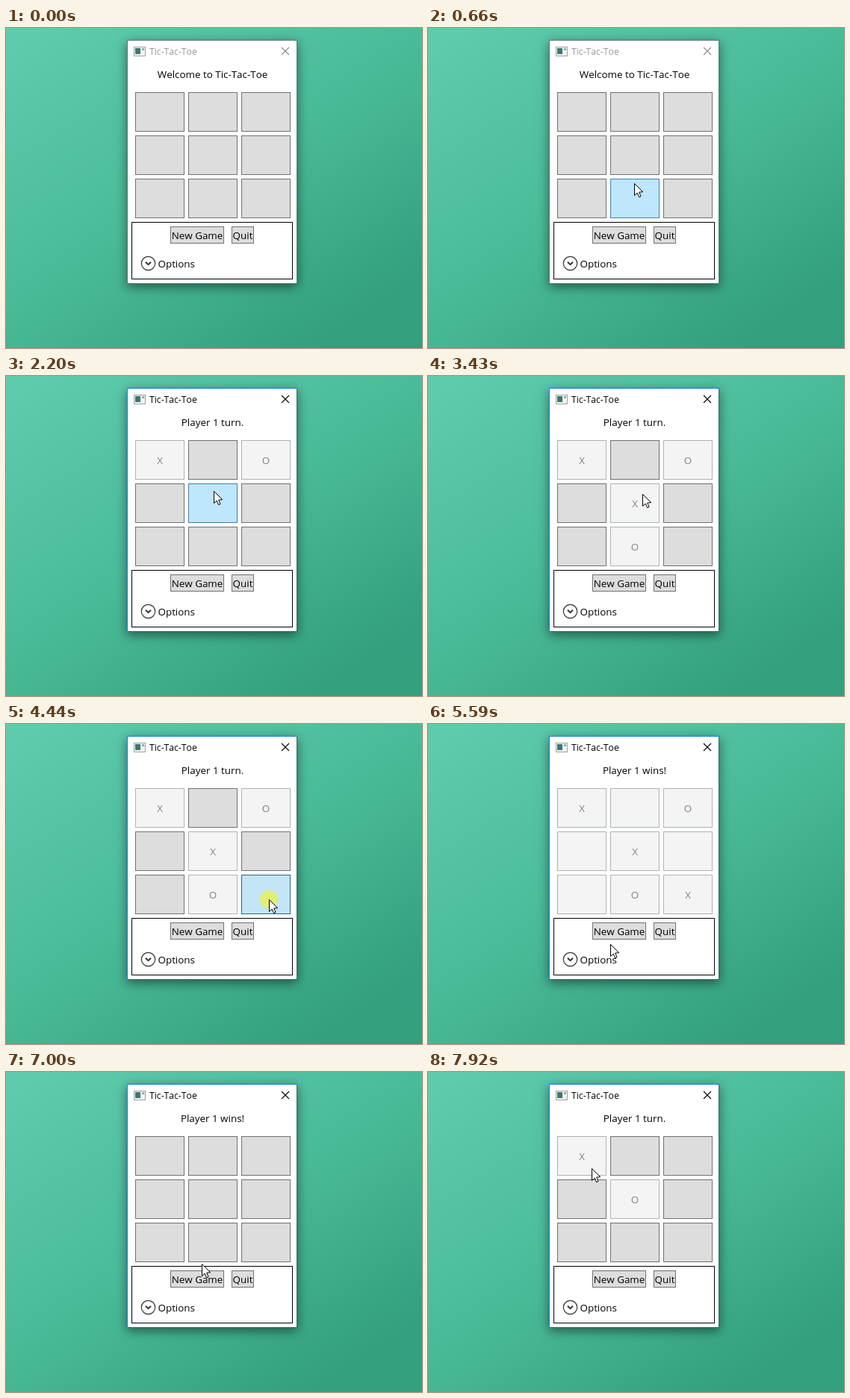
Recreate the animation shown at these times as an HTML page with a canvas. Size 557 by 429 pixels, loop 8000 ms.

```html
<!DOCTYPE html>
<html lang="en">
<head>
<meta charset="utf-8">
<title>Tic-Tac-Toe</title>
<style>
  html, body { margin: 0; width: 100%; height: 100%; overflow: hidden; }
  canvas { display: block; }
</style>
</head>
<body>
<canvas id="stage" width="557" height="429"></canvas>
<script>
const ctx = document.getElementById('stage').getContext('2d');
const LOOP = 8000, TICK = 76, CURSOR_ENTERS = 200, ACTIVATED = 1200;

// Game states: start time, message, board (row by row), finished
const STATES = [
  { at: 0,    message: 'Welcome to Tic-Tac-Toe', board: '.........' },
  { at: 1360, message: 'Player 1 turn.', board: 'X.O......' },
  { at: 2660, message: 'Player 1 turn.', board: 'X.O.X..O.' },
  { at: 4520, message: 'Player 1 wins!', board: 'X.O.X..OX', over: true },
  { at: 6600, message: 'Player 1 wins!', board: '.........' },
  { at: 7610, message: 'Player 1 turn.', board: 'X...O....' },
];

const PRESSES = [[1200, 1360], [2430, 2660], [4370, 4520], [6530, 6600], [7455, 7610]];

// Pointer moves: start time, number of ticks, end point, optional bend point
const ENTRY = [427, 401];
const MOVES = [
  { at: 200,  ticks: 11, to: [211, 125] },
  { at: 1050, ticks: 1,  to: [213, 118] },
  { at: 1970, ticks: 5,  to: [285, 158] },
  { at: 3430, ticks: 1,  to: [287, 158] },
  { at: 3660, ticks: 8,  to: [352, 235], bend: [340, 175] },
  { at: 4670, ticks: 5,  to: [382, 282] },
  { at: 5050, ticks: 2,  to: [378, 292] },
  { at: 5200, ticks: 6,  to: [244, 295], bend: [290, 319] },
  { at: 5660, ticks: 5,  to: [262, 278] },
  { at: 7000, ticks: 1,  to: [262, 257] },
  { at: 7076, ticks: 5,  to: [216, 125] },
  { at: 7920, ticks: 1,  to: [219, 129] },
];

const NORMAL = ['#dddddd', '#707070'];
const HOVER = ['#bee6fd', '#3c7fb1'];
const PRESSED = ['#c4e5f6', '#2c628b'];
const DISABLED = ['#f4f4f4', '#adb2b5'];

const smooth = p => p * p * (3 - 2 * p);

function pointerAt(t) {
  let from = ENTRY;
  for (const { at, ticks, to, bend } of MOVES) {
    if (t < at) break;
    const p = smooth(Math.min(1, (Math.floor((t - at) / TICK) + 1) / ticks));
    const start = from;
    from = to.map((end, i) => {
      const mid = bend ? bend[i] : (start[i] + end) / 2;
      return Math.round((1 - p) ** 2 * start[i] + 2 * p * (1 - p) * mid + p * p * end);
    });
  }
  return from;
}

function box(x, y, w, h, [fill, border]) {
  ctx.fillStyle = border;
  ctx.fillRect(x, y, w, h);
  ctx.fillStyle = fill;
  ctx.fillRect(x + 1, y + 1, w - 2, h - 2);
}

function text(string, x, y, { color = '#000', size = 13.4, align = 'center' } = {}) {
  ctx.font = `${size}px "Open Sans", "Noto Sans", sans-serif`;
  ctx.fontKerning = 'none';
  ctx.textAlign = align;
  ctx.fillStyle = color;
  ctx.fillText(string, x, y);
}

function polyline(points, color, width) {
  ctx.beginPath();
  points.forEach(([x, y]) => ctx.lineTo(x, y));
  ctx.strokeStyle = color;
  ctx.lineWidth = width;
  ctx.stroke();
}

function circle(x, y, r) {
  ctx.beginPath();
  ctx.arc(x, y, r, 0, 2 * Math.PI);
}

function drawDesktop() {
  const shade = ctx.createLinearGradient(90, -20, 390, 449);
  shade.addColorStop(0, '#5dcbac');
  shade.addColorStop(0.5, '#4abb98');
  shade.addColorStop(1, '#339f7c');
  ctx.fillStyle = shade;
  ctx.fillRect(0, 0, 557, 429);
}

function drawWindow(active) {
  ctx.save();
  ctx.shadowColor = 'rgba(0,0,0,.5)';
  ctx.shadowBlur = 14;
  ctx.shadowOffsetY = 4;
  ctx.fillStyle = active ? '#43636a' : '#587d74';
  ctx.fillRect(162, 16, 228, 327);
  ctx.restore();
  if (active) {
    ctx.fillStyle = '#1883d7';
    ctx.fillRect(162, 16, 228, 1);
    ctx.fillRect(162, 16, 1, 327);
  }
  ctx.fillStyle = '#fff';
  ctx.fillRect(163, 17, 226, 325);

  box(171, 25, 16, 13, ['#f4f4f4', '#a0a0a0']);
  ctx.fillStyle = '#3f7773';
  ctx.fillRect(173, 27, 7, 8);
  ctx.fillStyle = '#8ab5a5';
  ctx.fillRect(182, 27, 3, 3);

  text('Tic-Tac-Toe', 192, 36, { color: active ? '#000' : '#999', size: 12.2, align: 'left' });
  const ink = active ? '#000' : '#8a8a8a';
  polyline([[369, 26], [379, 36]], ink, 1.1);
  polyline([[379, 26], [369, 36]], ink, 1.1);
}

function drawExpander(hover) {
  circle(190.5, 315.5, 9.2);
  ctx.fillStyle = hover ? '#f3f9ff' : '#fff';
  ctx.fill();
  ctx.strokeStyle = hover ? '#5593ff' : '#333';
  ctx.lineWidth = 1.2;
  ctx.stroke();
  polyline([[187, 313.7], [190.5, 317.2], [194, 313.7]], hover ? '#000' : '#333', 2);
  text('Options', 203.5, 321, { align: 'left' });
}

function drawPointer(x, y, pressed) {
  if (pressed) {
    circle(x, y, 12);
    ctx.fillStyle = 'rgba(245,245,30,.6)';
    ctx.fill();
  }
  ctx.save();
  ctx.translate(x + 0.5, y + 0.5);
  ctx.beginPath();
  [[0, 0], [0, 16], [3.7, 12.6], [6.2, 18.2], [8.6, 17.2], [6.2, 11.6], [11.2, 11.2]]
    .forEach(([px, py]) => ctx.lineTo(px, py));
  ctx.closePath();
  ctx.fillStyle = '#fff';
  ctx.fill();
  ctx.strokeStyle = '#000';
  ctx.lineWidth = 1;
  ctx.stroke();
  ctx.restore();
}

function draw(t) {
  const state = STATES.findLast(s => t >= s.at);
  const [px, py] = pointerAt(t);
  const visible = t >= CURSOR_ENTERS;
  const pressed = PRESSES.some(([down, up]) => t >= down && t < up);
  const over = (x, y, w, h) => visible && px >= x && px < x + w && py >= y && py < y + h;
  const button = (x, y, w, h, enabled = true) =>
    box(x, y, w, h, !enabled ? DISABLED : !over(x, y, w, h) ? NORMAL : pressed ? PRESSED : HOVER);

  drawDesktop();
  drawWindow(t >= ACTIVATED);
  text(state.message, 276.5, 67);

  [...state.board].forEach((mark, i) => {
    const x = 173 + 71 * (i % 3), y = 86 + 58 * Math.floor(i / 3);
    button(x, y, 66, 53, mark === '.' && !state.over);
    if (mark !== '.') text(mark, x + 33, y + 32, { color: '#838383' });
  });

  box(168, 260, 216, 77, ['#fff', '#000']);
  button(220, 266, 72, 23);
  text('New Game', 256, 283);
  button(302, 266, 30, 23);
  text('Quit', 317, 283);
  drawExpander(over(181, 305, 194, 21));

  if (visible) drawPointer(px, py, pressed);
}

const begin = performance.now();
function frame() {
  draw((performance.now() - begin) % LOOP);
  requestAnimationFrame(frame);
}
frame();
</script>
</body>
</html>
```
